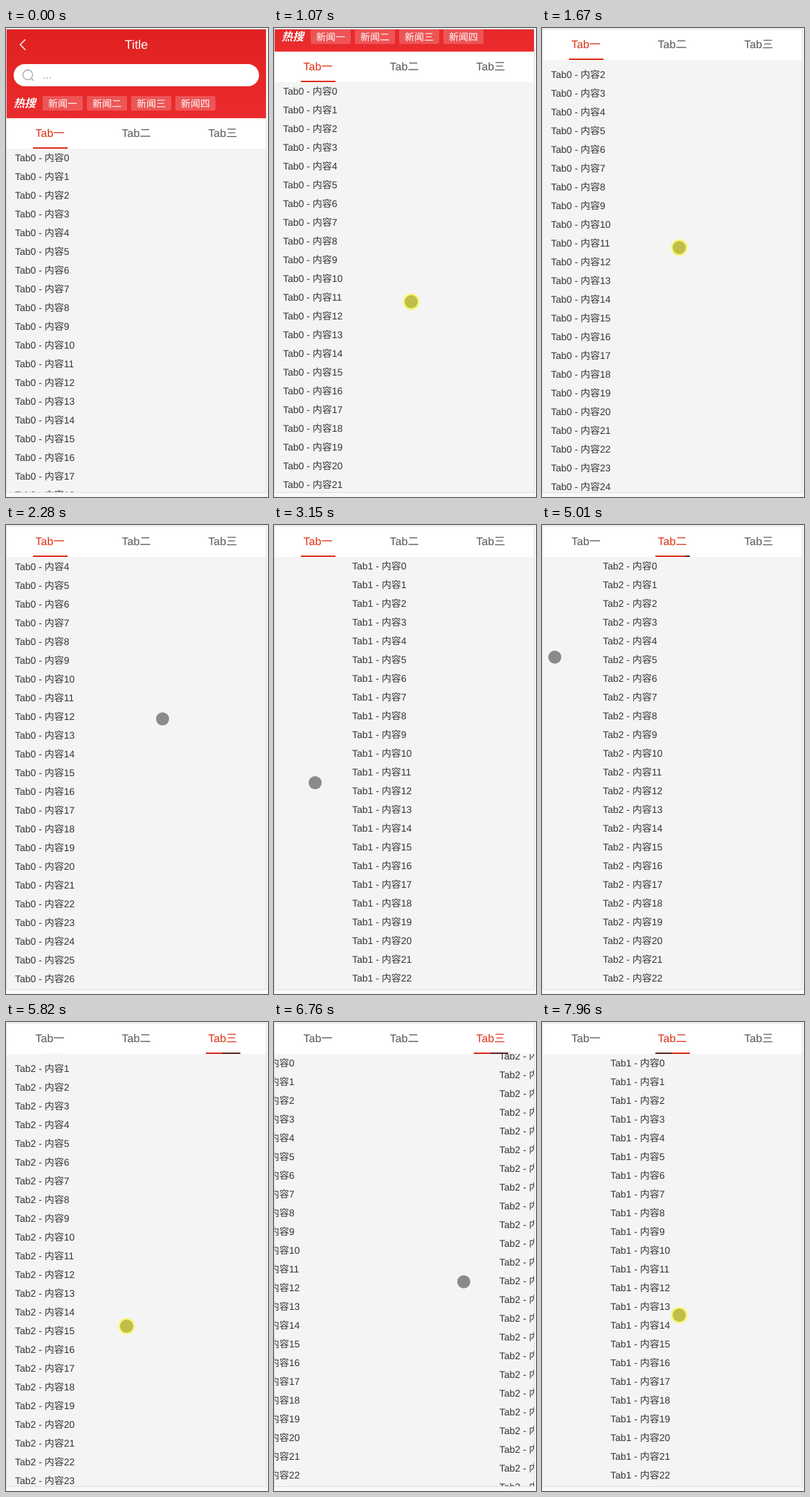
Animation, 379 px wide and 676 px high, one loop 8000 ms. Source, as an HTML page with a canvas:

```html
<!DOCTYPE html>
<html lang="zh">
<head>
<meta charset="utf-8">
<title>Sticky tabs</title>
<style>
  html, body { margin: 0; width: 100%; height: 100%; overflow: hidden; background: #f9f9f9; }
  canvas { display: block; }
</style>
</head>
<body>
<canvas id="stage" width="379" height="676"></canvas>
<script>
const ctx = document.getElementById('stage').getContext('2d');
const FONT = '"Liberation Sans", Arial, "Noto Sans CJK SC", "Noto Sans CJK", sans-serif';
const LOOP = 8000, STEP = 66.9;
const PAGE_WIDTH = 375, HEADER = 128, ROW = 27;
const ENTER = 60, SETTLE = 300, SELECT_DELAY = 200, SLIDE = 260;
const RED = [220, 46, 18], GREY = [85, 85, 85];

// Everything on screen follows these drags: "list" scrolls, "tab" swipes to a page.
// "shade" is the width of the dark leading edge the swipe leaves on the underline.
const GESTURES = [
  { start: 335, end: 2140, from: [198, 490], to: [198, 255], list: 0 },
  { start: 2600, end: 3144, from: [334, 371], to: [59, 371], tab: 1, shade: 7 },
  { start: 4620, end: 4880, from: [225, 183], to: [18, 190], tab: 2, shade: 26 },
  { start: 5550, end: 6080, from: [174, 457], to: [174, 420], list: 2 },
  { start: 6400, end: 6690, from: [32, 374], to: [274, 374], tab: 1, shade: 24 },
  { start: 7640, end: LOOP, from: [112, 437], to: [208, 420], tab: 0, shade: 0 }
];
const SWIPES = GESTURES.filter(g => 'tab' in g);

const progress = (t, from, to) => Math.min(1, Math.max(0, (t - from) / (to - from)));
const mix = (a, b, k) => a + (b - a) * k;
const smooth = k => k * k * (3 - 2 * k);
const easeOut = k => 1 - (1 - k) ** 3;

// Distance dragged so far along an axis: 0 = left, 1 = up.
const dragged = (g, axis, t) => (g.from[axis] - g.to[axis]) * progress(t, g.start, g.end);

function cursorAt(t) {
  let at = [305, 655], since = ENTER;
  for (const g of GESTURES) {
    if (t < g.start) {
      const gap = g.start - since;
      const k = smooth(progress(t, since + gap * .1, since + gap * .76));
      return at.map((v, axis) => mix(v, g.from[axis], k));
    }
    if (t < g.end) return g.from.map((v, axis) => v - dragged(g, axis, t));
    at = g.to;
    since = g.end;
  }
  return at;
}

function pageAt(t) {
  let page = 0;
  for (const g of SWIPES) {
    if (t < g.start) break;
    const settled = easeOut(progress(t, g.end, g.end + SETTLE));
    page = mix(page + dragged(g, 0, t), g.tab * PAGE_WIDTH, settled);
  }
  return Math.round(page);
}

function scrollAt(list, t) {
  return Math.round(GESTURES.filter(g => g.list === list)
    .reduce((sum, g) => sum + dragged(g, 1, t), 0));
}

function rect(x, y, w, h, color) {
  ctx.fillStyle = color;
  ctx.fillRect(x, y, w, h);
}

function roundRect(x, y, w, h, r, color) {
  ctx.fillStyle = color;
  ctx.beginPath();
  ctx.roundRect(x, y, w, h, r);
  ctx.fill();
}

function disc(x, y, r, color) {
  ctx.fillStyle = color;
  ctx.beginPath();
  ctx.arc(x, y, r, 0, Math.PI * 2);
  ctx.fill();
}

function text(str, x, y, size, color, align = 'left', style = '') {
  ctx.font = `${style} ${size}px ${FONT}`;
  ctx.textRendering = 'geometricPrecision';
  ctx.textAlign = align;
  ctx.fillStyle = color;
  ctx.fillText(str, x, y);
}

function line(points, color, width) {
  ctx.strokeStyle = color;
  ctx.lineWidth = width;
  ctx.beginPath();
  points.forEach(([x, y]) => ctx.lineTo(x, y));
  ctx.stroke();
}

function drawHeader() {
  const red = ctx.createLinearGradient(0, 2, 0, 130);
  red.addColorStop(0, '#e02020');
  red.addColorStop(1, '#ea2c2e');
  rect(1, 2, 375, 128, red);
  line([[28, 16.5], [20.5, 24], [28, 31.5]], '#fff', 1.5);
  text('Title', 188.5, 30, 18, '#fff', 'center');

  roundRect(11, 52, 355, 32, 16, '#fff');
  ctx.strokeStyle = '#aaa';
  ctx.lineWidth = 1.4;
  ctx.beginPath();
  ctx.arc(31.5, 67.5, 7, 0, Math.PI * 2);
  ctx.stroke();
  line([[36.5, 72.5], [40, 76]], '#aaa', 1.4);
  text('...', 53, 73, 16, '#aaa');

  text('热搜', 11, 114, 16, '#fff', 'left', 'italic 900');
  [...'一二三四'].forEach((n, i) => {
    roundRect(53 + i * 64, 98, 58, 21, 2, 'rgba(255,255,255,.2)');
    text('新闻' + n, 61 + i * 64, 114, 14, '#fff');
  });
}

function drawList(tab, x, top, scroll) {
  for (let i = 0; i < 40; i++) {
    const y = top + i * ROW - scroll;
    if (y > -ROW && y < 676) text(`Tab${tab} - 内容${i}`, x + 13, y + 18, 14, '#333');
  }
}

function drawTabs(top, t) {
  const done = SWIPES.filter(g => g.end + SELECT_DELAY <= t);
  const [before, now] = [{ tab: 0 }, { tab: 0, shade: 0, end: -LOOP }, ...done].slice(-2);
  const selected = now.end + SELECT_DELAY;
  const k = easeOut(progress(t, selected, selected + SLIDE));

  rect(1, top, 375, 44, '#fff');
  [...'一二三'].forEach((n, tab) => {
    const heat = tab === now.tab ? k : tab === before.tab ? 1 - k : 0;
    const color = GREY.map((g, i) => Math.round(mix(g, RED[i], heat)));
    text('Tab' + n, 63.5 + tab * 125, top + 27, 16, `rgb(${color})`, 'center');
  });

  const x = Math.round(39 + 125 * mix(before.tab, now.tab, k));
  const shadeX = now.tab > before.tab ? x + 50 - now.shade : x;
  rect(x, top + 42, 50, 2, '#de2816');
  rect(shadeX, top + 42, now.shade, 2, '#5a2020');
}

function drawCursor(t) {
  if (t < ENTER) return;
  const [x, y] = cursorAt(t).map(v => Math.round(v) + .5);
  const pressed = GESTURES.some(g => t >= g.start && t < g.end);
  disc(x, y, pressed ? 12 : 10.5, pressed ? '#f8f57c' : 'rgba(255,255,255,.5)');
  disc(x, y, 9.5, pressed ? '#bfbe48' : '#8a8a8a');
}

function draw(t) {
  const page = pageAt(t), scroll = scrollAt(0, t);
  const lift = Math.min(scroll, HEADER); // the tabs stick once the header is gone
  const tabsTop = 130 - lift;

  rect(0, 0, 379, 676, '#f9f9f9');
  rect(0, 1, 377, 669, '#dedede');
  ctx.save();
  ctx.beginPath();
  ctx.rect(1, 2, 375, 667);
  ctx.clip();
  rect(1, 2, 375, 667, '#f4f4f4');
  [scroll - lift, 0, scrollAt(2, t)].forEach((offset, tab) => {
    const x = tab * PAGE_WIDTH - page;
    if (Math.abs(x) < PAGE_WIDTH) drawList(tab, x, tabsTop + 44, offset);
  });
  ctx.save();
  ctx.translate(0, -lift);
  drawHeader();
  ctx.restore();
  drawTabs(tabsTop, t);
  drawCursor(t);
  ctx.restore();
}

function frame() {
  const t = performance.now() % LOOP;
  draw(Math.floor((t + 6) / STEP) * STEP);
  requestAnimationFrame(frame);
}
frame();
</script>
</body>
</html>
```
